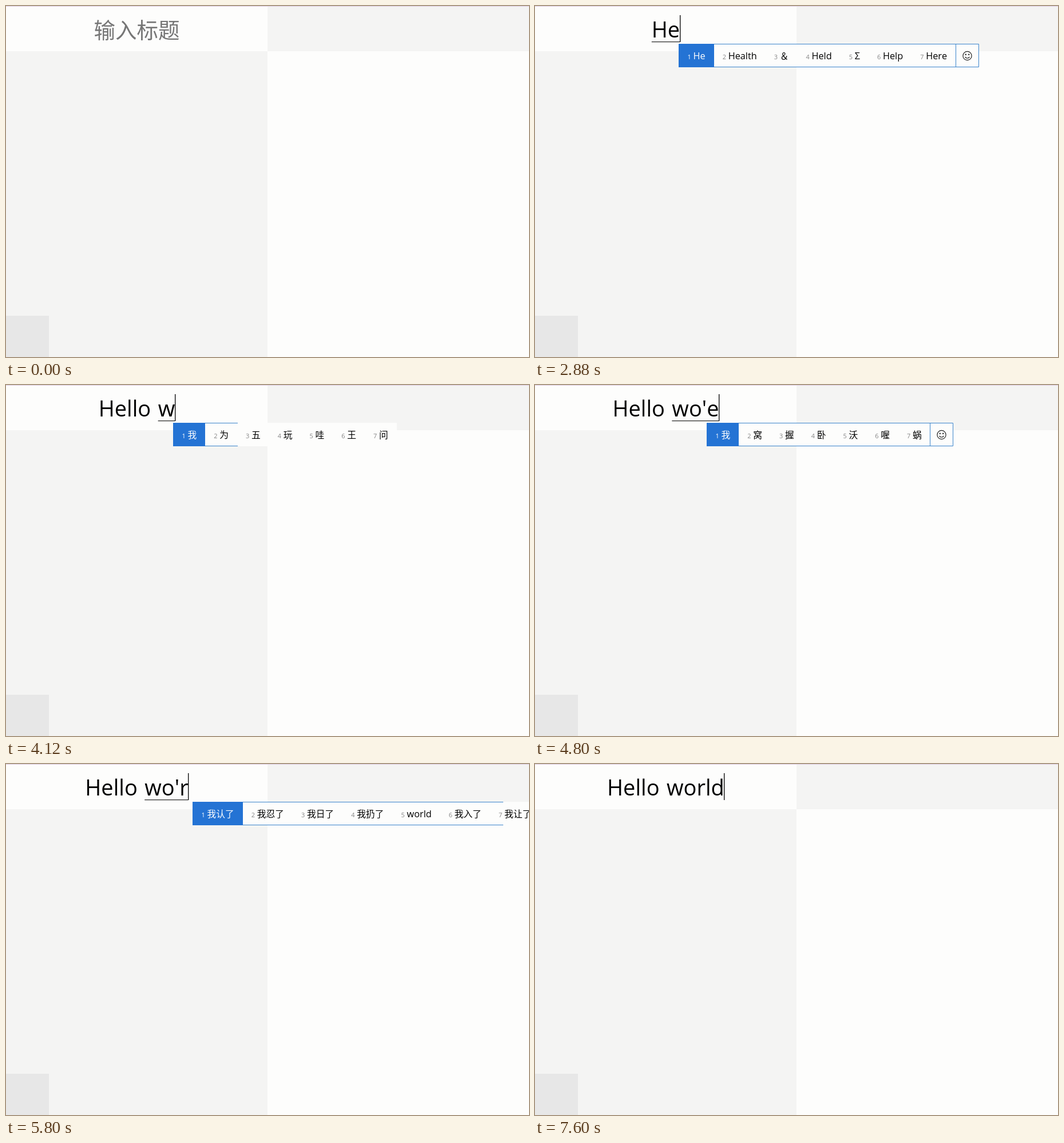
An HTML page for the animation above (8000 ms loop, 914 px wide and 613 px high).

```html
<!DOCTYPE html>
<html lang="zh-CN">
<head>
<meta charset="utf-8">
<title>输入标题</title>
<style>
  html, body { margin: 0; width: 100%; height: 100%; overflow: hidden; background: #fdfdfc; }
  svg { display: block; }
  text {
    font-family: "Open Sans", "Noto Sans CJK SC", "Noto Sans CJK", sans-serif;
    font-kerning: none;
    white-space: pre;
  }
  .title { font-size: 38px; word-spacing: 2.5px; }
  .hint { font-size: 37.5px; fill: #767676; }
</style>
</head>
<body>
<svg width="914" height="613" viewBox="0 0 914 613">
  <rect width="914" height="613" fill="#fdfdfc"/>
  <rect y="79" width="457" height="534" fill="#f4f4f3"/>
  <rect x="457" width="457" height="79" fill="#f4f4f3"/>
  <rect y="541" width="75" height="72" fill="#e7e7e7"/>
  <rect width="914" height="1" fill="#dfcde2"/>
  <g id="field"></g>
  <g id="picker"></g>
</svg>
<script>
const LOOP = 8000;
const CENTER = 228.5;
const BLUE = '#3a84cc';
const FONT = '"Open Sans", "Noto Sans CJK SC", "Noto Sans CJK", sans-serif';
const field = document.getElementById('field');
const picker = document.getElementById('picker');
const ctx = document.createElement('canvas').getContext('2d');

function measure(text, size) {
  ctx.font = `${size}px ${FONT}`;
  ctx.fontKerning = 'none';
  return ctx.measureText(text).width;
}

// A candidate bar: left edge, words, and optional gap, edge (border drawn so far) and clip.
const bar = (x, words, more) => ({ x, words: words.split(' '), gap: 0, ...more });

const h = bar(238, '和 会 好 还 后 或 很');
const he = bar(251, 'He Health ＆ Held Σ Help Here');
const hel = bar(253, 'Hel Help Held Hello Helen Helmet Helper');
const hell = bar(259, 'Hell Hello Hellos Helled Hells Heller');
const hello = bar(270, 'Hello 合理咯 Hellos 和 喝 何 河');
const w = bar(292, '我 为 五 玩 哇 王 问', { clip: 391 });
const wo = bar(300, '我 窝 握 卧 沃 喔 蜗');
const woe = bar(307, '我饿 我额 沃尔 我儿 沃恩 我欸 我二');
const woel = { ...woe, x: 319, gap: 17, clip: 543 };
const wor = bar(313, '我人 我让 我日 我认 我热 我入 我忍');
const worl = bar(326, '我认了 我忍了 我日了 我扔了 world 我入了 我让了');
const world = bar(327, 'world World 我认了的 我忍了的 我日了的 我扔了的 worlds');
const drawn = (b, edge) => ({ ...b, edge });

// time, committed text, text being composed, caret, bar
const steps = [
  [0, '', '', 0],
  [640, '', '', 1],
  [960, '', '', 0],
  [1520, '', '', 1],
  [1960, '', '', 0],
  [2520, '', 'H', 1],
  [2600, '', 'H', 1, drawn(h, 112)],
  [2640, '', 'H', 1, h],
  [2800, '', 'He', 1, h],
  [2840, '', 'He', 1, drawn(he, 432)],
  [2880, '', 'He', 1, he],
  [3040, '', 'Hel', 1, he],
  [3080, '', 'Hel', 1, drawn(hel, 525)],
  [3120, '', 'Hel', 1, hel],
  [3200, '', 'Hell', 1, hel],
  [3240, '', 'Hell', 1, hell],
  [3360, '', 'Hello', 1, hell],
  [3400, '', 'Hello', 1, hello],
  [3600, 'Hello', '', 1],
  [4000, 'Hello ', '', 1],
  [4040, 'Hello ', 'w', 1],
  [4080, 'Hello ', 'w', 1, drawn(w, 57)],
  [4120, 'Hello ', 'w', 1, drawn(w, 113)],
  [4200, 'Hello ', 'w', 1, w],
  [4440, 'Hello ', 'wo', 1, w],
  [4520, 'Hello ', 'wo', 1, wo],
  [4800, 'Hello ', "wo'e", 1, wo],
  [4840, 'Hello ', "wo'e", 1, drawn(woe, 432)],
  [4880, 'Hello ', "wo'e", 1, woe],
  [5080, 'Hello ', "wo'e'l", 1, woe],
  [5160, 'Hello ', "wo'e'l", 1, woel],
  [5440, 'Hello ', "wo'e", 1, woel],
  [5480, 'Hello ', "wo'e", 1, woe],
  [5560, 'Hello ', 'wo', 1, woe],
  [5600, 'Hello ', 'wo', 1, wo],
  [5680, 'Hello ', "wo'r", 1, wo],
  [5720, 'Hello ', "wo'r", 1, wor],
  [5800, 'Hello ', "wo'r", 1, drawn(worl, 543)],
  [5840, 'Hello ', "wo'r'l", 1, worl],
  [5960, 'Hello ', 'world', 1, worl],
  [6040, 'Hello ', 'world', 1, drawn(world, 680)],
  [6080, 'Hello ', 'world', 1, world],
  [6600, 'Hello world', '', 1],
  [7040, 'Hello world', '', 0],
  [7600, 'Hello world', '', 1]
];

function fieldMarkup(done, typed, caret) {
  const spaces = done.split(' ').length - 1;
  const doneWidth = done ? measure(done, 38) + 2.5 * spaces : 0;
  const width = doneWidth + (typed ? measure(typed, 38) : 0);
  const left = CENTER - width / 2;
  const start = left + doneWidth;
  const right = left + width;
  let out = '';
  if (!width) out += `<text class="hint" x="${CENTER}" y="56" text-anchor="middle">输入标题</text>`;
  if (done) out += `<text class="title" x="${left}" y="55">${done}</text>`;
  if (typed) {
    out += `<text class="title" x="${start}" y="55">${typed}</text>`;
    out += `<rect x="${start}" y="62" width="${right - start}" height="1.2" fill="#222"/>`;
  }
  if (caret) out += `<rect x="${Math.round(right - 0.6)}" y="16" width="1.4" height="47" fill="#111"/>`;
  return out;
}

function smiley(x) {
  return `<g transform="translate(${x} 21)" fill="none" stroke="#222" stroke-width="1.2">
    <circle r="7.6"/><path d="M-4 2Q0 6.5 4 2"/>
    <g fill="#222" stroke="none"><circle cx="-2.7" cy="-2.3" r="1.2"/><circle cx="2.7" cy="-2.3" r="1.2"/></g></g>`;
}

function barMarkup({ x, words, gap, edge, clip }) {
  let at = 0, labels = '', chosen = '';
  words.forEach((word, i) => {
    const size = /[A-Za-zΣ]/.test(word) ? 16.3 : 15.75;
    const width = 40 + measure(word, size);
    if (!i) chosen = `<rect width="${Math.ceil(width)}" height="41" fill="#2473d4"/>`;
    labels += `<text x="${at + 15.5}" y="27" font-size="11" fill="${i ? '#858585' : '#fff'}">${i + 1}</text>`;
    labels += `<text x="${at + 25.5}" y="27.3" font-size="${size}" fill="${i ? '#000' : '#fff'}">${word}</text>`;
    at += width;
  });
  const divider = Math.round(at + gap);
  const full = divider + 41;
  const frame = edge
    ? `<path d="M0 .5H${edge}M0 40.5H${edge}" stroke="${BLUE}"/>`
    : `<path d="M.5 .5H${full - 0.5}V40.5H.5ZM${divider + 0.5} 0V41" fill="none" stroke="${BLUE}"/>${smiley(divider + 20.5)}`;
  return `<svg x="${x}" y="66" width="${clip || full}" height="41">
    <rect width="${full}" height="41" fill="#fdfdfc"/>${frame}${chosen}${labels}</svg>`;
}

let shown = null;
function draw(now) {
  const t = now % LOOP;
  const step = steps.findLast(s => s[0] <= t);
  if (step !== shown) {
    const [, done, typed, caret, list] = step;
    field.innerHTML = fieldMarkup(done, typed, caret);
    picker.innerHTML = list ? barMarkup(list) : '';
    shown = step;
  }
}

const began = performance.now();
function tick() {
  draw(performance.now() - began);
  requestAnimationFrame(tick);
}
tick();
</script>
</body>
</html>
```
